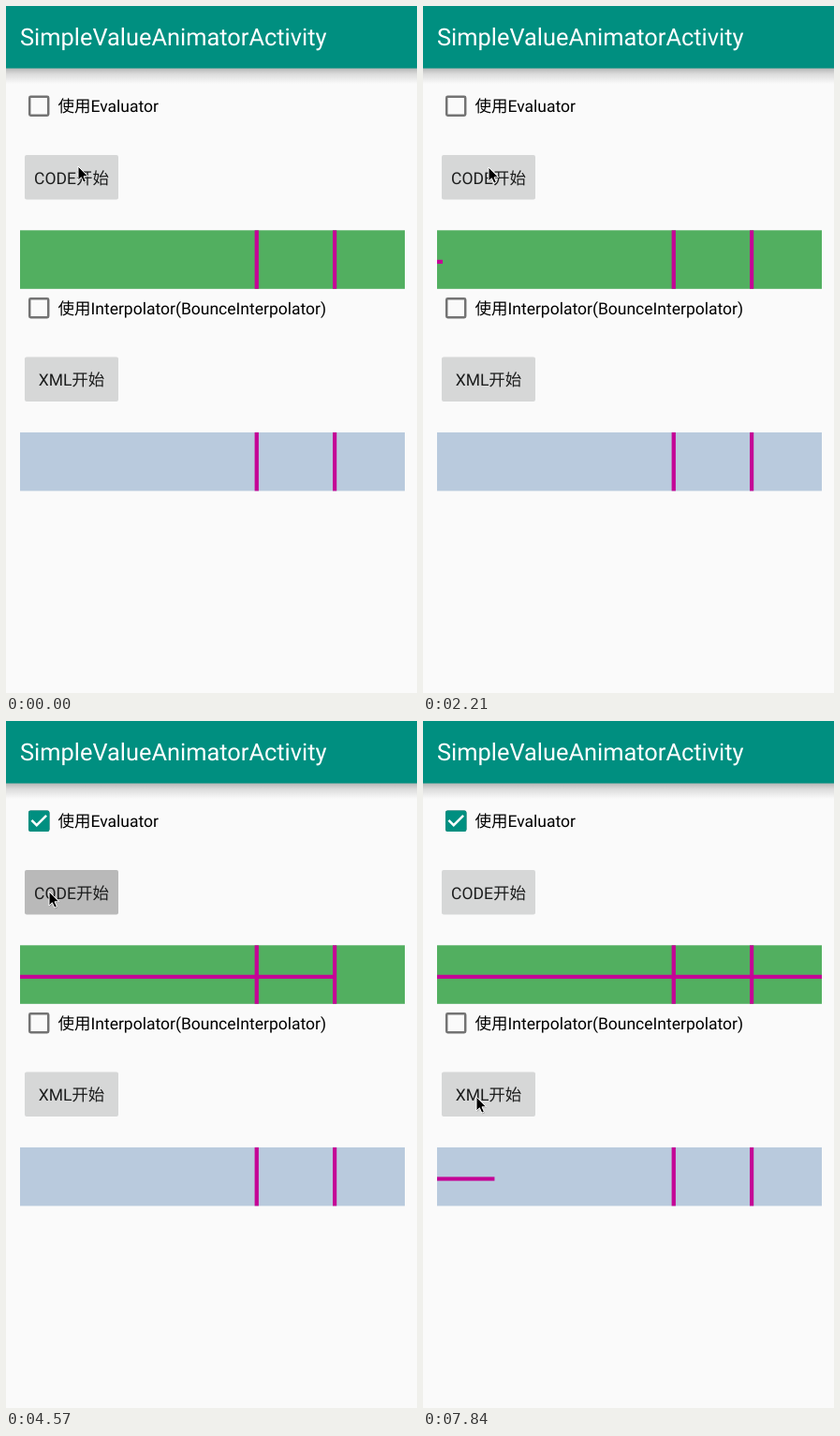
These frames come from a looping animation (439 px wide and 733 px high, 7990 ms). An HTML page:

```html
<!DOCTYPE html>
<html lang="zh-CN">
<head>
<meta charset="utf-8">
<title>SimpleValueAnimatorActivity</title>
<style>
  html, body { margin: 0; width: 100%; height: 100%; overflow: hidden; background: #fafafa; }
  svg { display: block; width: 439px; height: 733px; }
  text { font: 17.5px Roboto, "Noto Sans CJK SC", "Noto Sans CJK", sans-serif; text-rendering: geometricPrecision; }
  .title { font-size: 25.4px; fill: #fff; }
  .label { text-anchor: middle; fill: #1c1d1d; }
  .mark { fill: #c40596; }
  .box { fill: none; stroke: #737373; stroke-width: 2.5; }
</style>
</head>
<body>
<svg viewBox="0 0 439 733">
  <defs>
    <linearGradient id="shade" x2="0" y2="1">
      <stop offset="0" stop-color="#b4b4b4"/>
      <stop offset=".4" stop-color="#dcdcdc"/>
      <stop offset="1" stop-color="#fafafa"/>
    </linearGradient>
    <path id="arrow" d="M0 0V15L3.4 11.8L5.8 17.2L8.4 16L6 10.8H10.6Z"/>
  </defs>
  <rect y="66" width="439" height="17" fill="url(#shade)"/>
  <rect width="439" height="66.5" fill="#008f80"/>
  <text class="title" x="15" y="41.5">SimpleValueAnimatorActivity</text>
  <g id="panels"></g>
  <g id="cursor">
    <use href="#arrow" x=".7" y="1.2" opacity=".2"/>
    <use href="#arrow" stroke="#fff"/>
  </g>
</svg>
<script>
const LOOP = 7990, STEP = 147.9, LAST = 53;
const $ = id => document.getElementById(id);
const set = (id, name, value) => $(id).setAttribute(name, value);
const clamp = v => Math.min(1, Math.max(0, v));

const panel = (id, y, option, label, color) => `
  <g transform="translate(0 ${y})">
    <circle id="${id}Ripple" cx="35" cy="107" r="20" opacity="0"/>
    <rect class="box" x="25.2" y="96.7" width="20" height="20" rx="1.2"/>
    <g id="${id}Check" visibility="hidden">
      <rect x="24" y="95.5" width="22.5" height="22.5" rx="2.2" fill="#008f80"/>
      <path d="M27.4 105.9L32.75 111.25L43.1 100.9" fill="none" stroke="#fff" stroke-width="2.5"/>
    </g>
    <text x="55.5" y="113">${option}</text>
    <rect id="${id}Button" x="20" y="159" width="100" height="47.5" rx="2"/>
    <text class="label" x="70" y="189.5">${label}</text>
    <rect x="15" y="239.3" width="411" height="62.5" fill="${color}"/>
    <rect class="mark" x="265.6" y="239.3" width="4.3" height="62.5"/>
    <rect class="mark" x="349" y="239.3" width="4.2" height="62.5"/>
    <rect id="${id}Line" class="mark" x="15" y="270.8" height="4.2"/>
  </g>`;

$("panels").innerHTML =
  panel("code", 0, "使用Evaluator", "CODE开始", "#52af60") +
  panel("xml", 215.6, "使用Interpolator(BounceInterpolator)", "XML开始", "#b9cadd");

// Pointer moves: first step, last step, destination
const moves = [
  [0, 3, 252, 520], [4, 12, 71, 194], [12, 13, 70, 172], [22, 23, 52, 155],
  [23, 25, 33, 104], [27, 30, 46, 182], [44, 50, 57, 401]
];

function pointer(k) {
  return moves.reduce(([x, y], [from, to, toX, toY]) => {
    const f = 1 - (1 - clamp((k - from) / (to - from))) ** 1.83;
    return [x + (toX - x) * f, y + (toY - y) * f];
  }, [77, 171]);
}

// Accelerate-decelerate growth, clipped to the bar
function grow(t, start, duration, end) {
  const f = clamp((t - start) / duration);
  return Math.min(411, end * (1 - Math.cos(Math.PI * f)) / 2);
}

const buttonColor = pressed => pressed ? "#b9b9b9" : "#d6d7d7";

function draw() {
  const k = Math.min(LAST, Math.floor((performance.now() % LOOP + 15) / STEP)), t = k * STEP;
  set("cursor", "transform", `translate(${pointer(k)})`);
  set("codeButton", "fill", buttonColor(k === 14 || k === 31));
  set("xmlButton", "fill", buttonColor(k === 51));
  set("codeCheck", "visibility", k >= 26 ? "visible" : "hidden");
  set("codeRipple", "opacity", k >= 25 ? .12 * clamp((28 - k) / 3) : 0);
  set("codeLine", "width", t < 4650 ? grow(t, 2133, 1000, 335) : grow(t, 4650, 1000, 417));
  set("xmlLine", "width", grow(t, 7626, 755, 335));
  requestAnimationFrame(draw);
}
draw();
</script>
</body>
</html>
```
